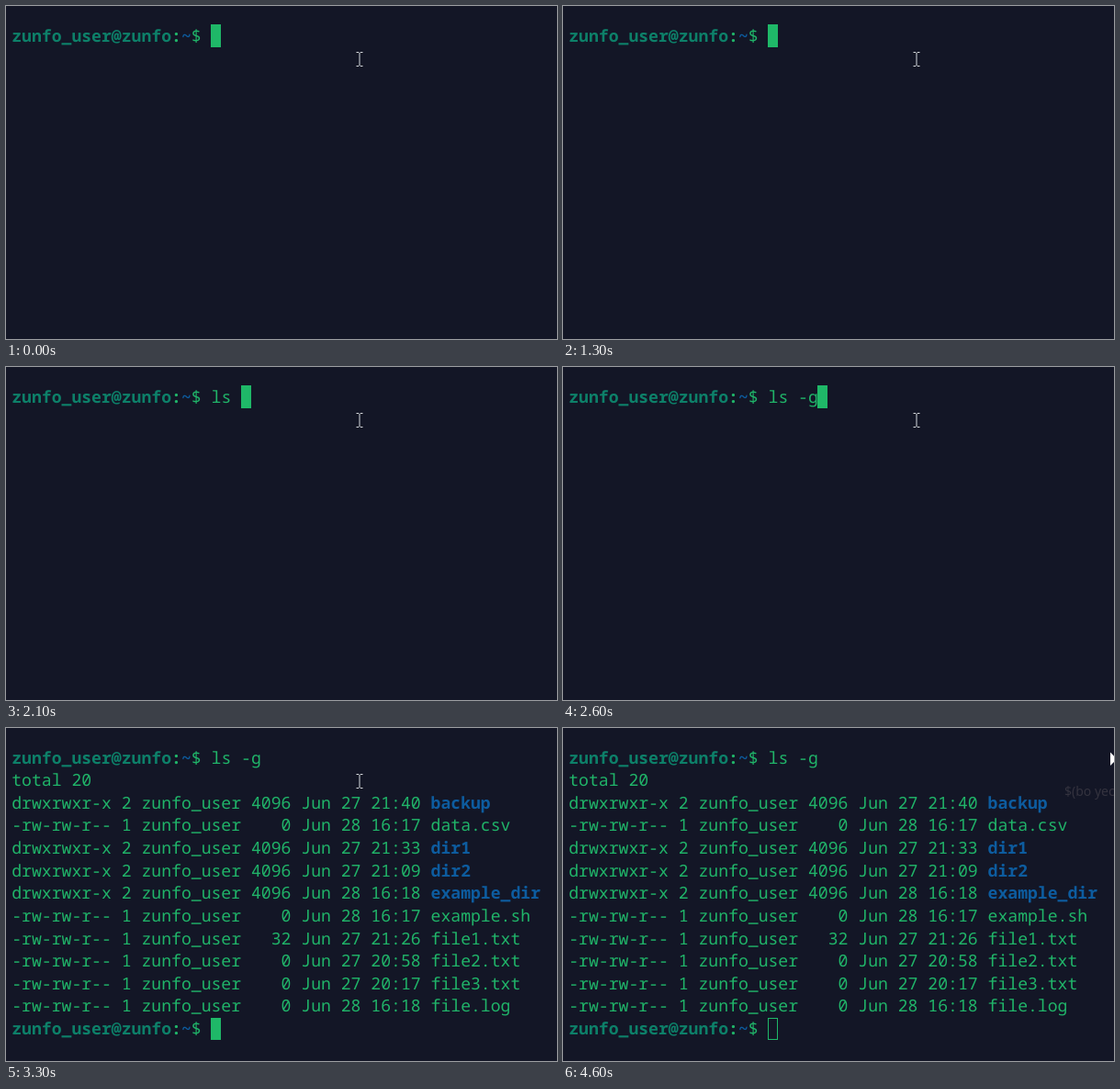
An HTML page for the animation above (4700 ms loop, 600 by 363 pixels).

```html
<!DOCTYPE html>
<html lang="en">
<head>
<meta charset="utf-8">
<title>Terminal listing</title>
<style>
  html, body { margin: 0; width: 100%; height: 100%; overflow: hidden; background: #131626; }
  #stage { position: relative; width: 600px; height: 363px; overflow: hidden; }
  #screen {
    position: absolute; left: 6.2px; top: 20.6px; margin: 0;
    font: 500 18.11px/24.63px "Noto Sans Mono", "DejaVu Sans Mono", monospace;
    text-rendering: geometricPrecision; color: #20b469;
  }
  b.user { color: #0d8069; }
  b.dir { color: #0d5c9f; }
  #caret { position: absolute; width: 11px; height: 24.5px; box-sizing: border-box; background: #1fb868; }
  #caret.hollow { background: none; border: 1px solid #1fb868; }
  svg { position: absolute; left: 0; top: 0; }
  #toast { font: 14px "Noto Sans", sans-serif; fill: #34333f; }
</style>
</head>
<body>
<div id="stage">
  <pre id="screen"></pre>
  <div id="caret"></div>
  <svg width="600" height="363">
    <text id="toast" x="546" y="74">$(bo yect</text>
    <path id="beam" d="M-3.5 -7.5h2.5l1 1l1 -1h2.5M0 -6.5v13M-3.5 7.5h2.5l1 -1l1 1h2.5" fill="none" stroke="#d5d9dd"/>
    <path id="arrow" d="M596 26.5L600 30.5V37L596 41Z" fill="#fff"/>
  </svg>
</div>
<script>
const LOOP = 4700, STEP = 100;
const CELL = 10.866, LINE = 24.63, LEFT = 6.2, TOP = 20;
const USER = "zunfo_user", HOST = "zunfo", PROMPT_LENGTH = 20;
const COMMAND = "ls -g";
const KEY_TIMES = [1400, 1600, 1900, 2200, 2500];
const ENTER = 2700, MOVE_START = 3500, MOVE_END = 3800, BLUR = 4400, TOAST = 4600;

const $ = id => document.getElementById(id);
const prompt = `<b class="user">${USER}@${HOST}</b><b>:</b><b class="dir">~</b>$ `;

const dir = (date, name) => `drwxrwxr-x 2 ${USER} 4096 Jun ${date} <b class="dir">${name}</b>`;
const file = (size, date, name) => `-rw-rw-r-- 1 ${USER} ${String(size).padStart(4)} Jun ${date} ${name}`;
const listing = [
  "total 20",
  dir("27 21:40", "backup"),
  file(0, "28 16:17", "data.csv"),
  dir("27 21:33", "dir1"),
  dir("27 21:09", "dir2"),
  dir("28 16:18", "example_dir"),
  file(0, "28 16:17", "example.sh"),
  file(32, "27 21:26", "file1.txt"),
  file(0, "27 20:58", "file2.txt"),
  file(0, "27 20:17", "file3.txt"),
  file(0, "28 16:18", "file.log"),
];

const show = (id, visible) => { $(id).style.display = visible ? "" : "none"; };
let shown = "";

function draw(t) {
  const typed = KEY_TIMES.filter(k => t >= k).length;
  const done = t >= ENTER;
  const lines = [prompt + COMMAND.slice(0, typed)];
  if (done) lines.push(...listing, prompt);
  const html = lines.join("\n");
  if (html !== shown) $("screen").innerHTML = shown = html;

  const caret = $("caret");
  const column = PROMPT_LENGTH + (done ? 0 : typed);
  caret.style.left = LEFT + column * CELL - 0.4 + "px";
  caret.style.top = TOP + (lines.length - 1) * LINE + "px";
  caret.className = t >= BLUR ? "hollow" : "";

  const p = Math.min(1, Math.max(0, (t - MOVE_START) / (MOVE_END - MOVE_START)));
  $("beam").setAttribute("transform", `translate(${385 + 211 * p} ${58 - 25 * p})`);
  show("beam", p < 1);
  show("arrow", p === 1);
  show("toast", t >= TOAST);
}

function tick() {
  draw(Math.floor((performance.now() % LOOP) / STEP) * STEP);
  requestAnimationFrame(tick);
}
tick();
</script>
</body>
</html>
```
